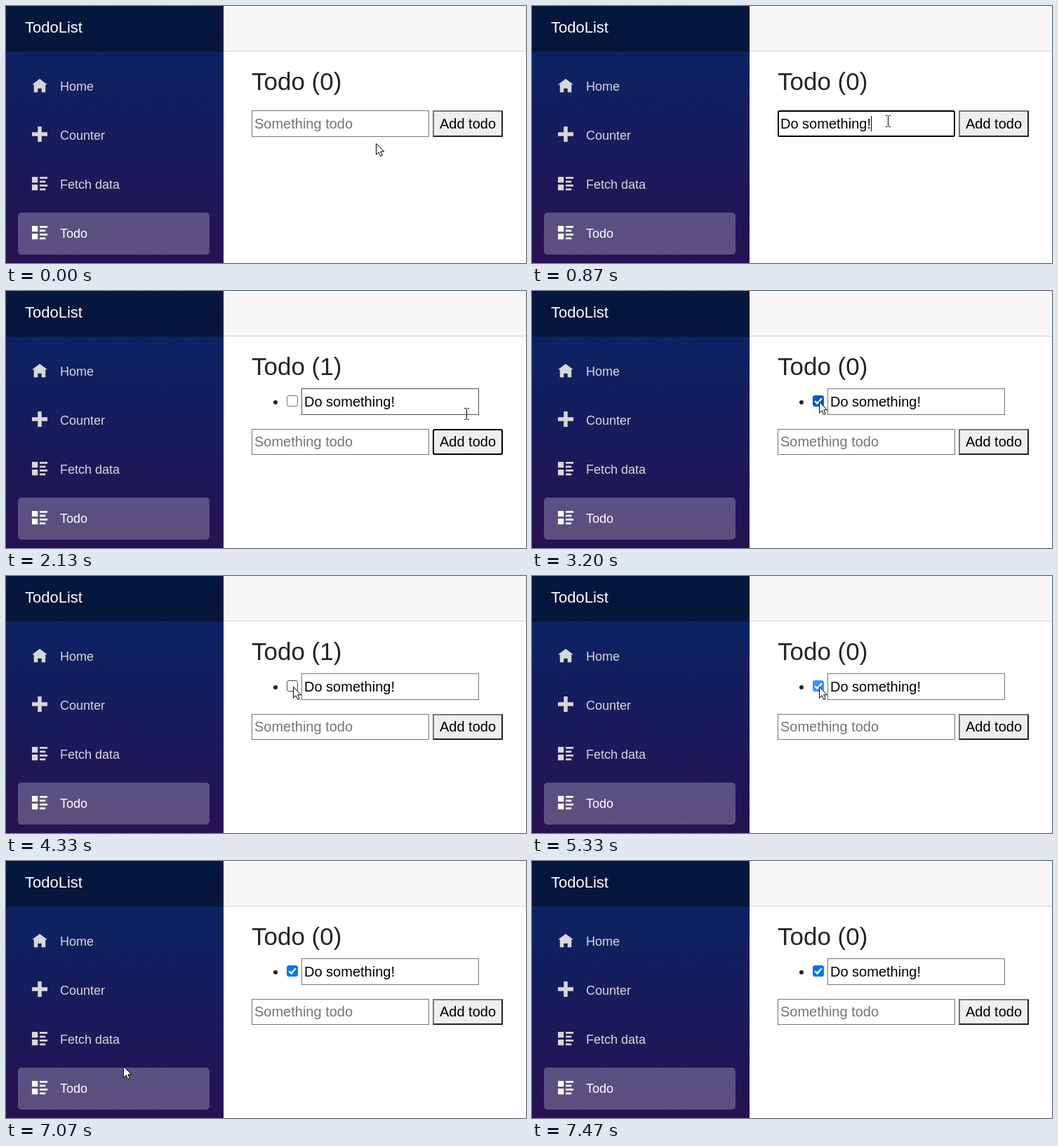
An HTML page that plays this animation: 741 by 367 pixels, repeating every 7.94 s.

```html
<!DOCTYPE html>
<html lang="en">
<head>
<meta charset="utf-8">
<title>Todo list</title>
<style>
  html, body { margin: 0; width: 100%; height: 100%; overflow: hidden; background: #fff; }
  body { position: relative; font-family: "Liberation Sans", Arial, sans-serif; color: #212529; }
  body *, body *::before { box-sizing: border-box; }
  .abs, .nav { position: absolute; white-space: pre; }
  #side { left: 0; top: 0; width: 310px; height: 367px;
    background: linear-gradient(rgb(5,39,103) -5px, #3a0647 585px); }
  #brand { left: 0; top: 0; width: 310px; height: 65px; padding-left: 27px;
    background: rgba(0,0,0,.4); color: #fff; font-size: 22px; line-height: 61px; }
  #bar { left: 310px; top: 0; width: 431px; height: 65px; background: #f7f7f7; border-bottom: 1px solid #d6d5d5; }
  .nav { left: 17px; width: 273px; height: 60px; padding-left: 60px; border-radius: 5px;
    color: #d7d7d7; font-size: 18px; line-height: 60px; }
  .nav svg { position: absolute; left: 20px; top: 19px; width: 22px; height: 22px; fill: currentColor; }
  .nav.active { color: #fff; background: rgba(255,255,255,.25); }
  .nav.hover { color: #fff; background: rgba(255,255,255,.1); }
  #title { left: 350px; top: 88px; font-size: 35px; line-height: 39px; }
  .field { width: 253px; height: 38px; padding-left: 3px; border: 1px solid #767676;
    background: #fff; color: #000; font-size: 20px; line-height: 36px; }
  .field.hover { border-color: #4f4f4f; }
  .empty { color: #757575; }
  .ring { outline: 2px solid #000; outline-offset: -2px; border-radius: 3px; }
  #entry { left: 350px; top: 149px; }
  #add { left: 608px; top: 149px; width: 100px; height: 38px; border: 2px solid;
    border-color: #767676 #212121 #212121 #767676; background: #efefef; color: #000;
    font-size: 20px; line-height: 34px; text-align: center; }
  #add.hover { background: #e5e5e5; }
  #add.down { background: #f5f5f5; }
  .listed #entry, .listed #add { top: 197px; height: 37px; }
  .listed #entry { line-height: 35px; }
  .listed #add { line-height: 33px; }
  #caret { top: 157px; width: 1px; height: 22px; background: #000; }
  #item { display: none; }
  .listed #item { display: block; }
  #item .field { left: 421px; top: 139px; }
  #dot { left: 381px; top: 156px; width: 6px; height: 6px; border-radius: 50%; background: #212529; }
  #box { left: 400px; top: 149px; width: 16px; height: 16px; border: 1px solid #767676;
    border-radius: 3px; background: #fff; }
  #box svg { position: absolute; left: -1px; top: -1px; visibility: hidden; }
  #box.hover { border-color: #4f4f4f; }
  #box.down { border-color: #8d8d8d; }
  #box.on { background: #0075ff; border-color: #0075ff; }
  #box.on.hover { background: #005cc8; border-color: #005cc8; }
  #box.on.down { background: #3793ff; border-color: #3793ff; }
  #box.on svg { visibility: visible; }
  #pointer { left: 0; top: 0; overflow: visible; }
</style>
</head>
<body>
<div id="side" class="abs"></div>
<div id="brand" class="abs">TodoList</div>
<div id="bar" class="abs"></div>
<div id="title" class="abs"></div>
<div id="item">
  <div id="dot" class="abs"></div>
  <div id="box" class="abs"><svg width="16" height="16"><path d="M3.2 8.2L6.6 11.6L12.8 4.2" fill="none" stroke="#fff" stroke-width="2.4"/></svg></div>
  <div id="task" class="abs field">Do something!</div>
</div>
<div id="entry" class="abs field"></div>
<div id="caret" class="abs"></div>
<div id="add" class="abs">Add todo</div>
<svg id="pointer" class="abs" width="1" height="1">
  <path id="arrow" d="M.5 .5V16.3L4.2 12.8L6.7 18.5L9.2 17.4L6.8 11.8H11.7Z" fill="#fff" stroke="#000"/>
  <path id="beam" d="M-3 -7.5H-.5M1.5 -7.5H4M.5 -7V8M-3 8.5H-.5M1.5 8.5H4" fill="none" stroke="#000"/>
</svg>
<script>
const LOOP = 7940, FRAME = 1000 / 15;
const $ = id => document.getElementById(id);

const LIST_ICON = 'M0 0h3v3H0zM4 0h4v1H4zM4 2h3v1H4zM0 4h3v3H0zM4 4h4v1H4zM4 6h3v1H4z';
const navs = [
  ['Home', 'M4 0L0 3h1v4h2V5h2v2h2V3h1z'],
  ['Counter', 'M3 0v3H0v2h3v3h2V5h3V3H5V0z'],
  ['Fetch data', LIST_ICON],
  ['Todo', LIST_ICON],
].map(([label, icon], i) => {
  const nav = document.createElement('div');
  nav.className = 'nav' + (label === 'Todo' ? ' active' : '');
  nav.style.top = 85 + 70 * i + 'px';
  const lift = label === 'Counter' ? -2 : 0;
  nav.innerHTML = `<svg viewBox="0 0 8 8" style="margin-top:${lift}px"><path d="${icon}"/></svg>${label}`;
  $('side').after(nav);
  return nav;
});

// Pointer path: time, x, y
const path = [
  [0, 527, 196], [70, 522, 189], [130, 508, 171], [200, 502, 163], [1000, 508, 164],
  [1130, 575, 172], [1270, 645, 179], [1330, 655, 178], [1930, 655, 178], [2130, 656, 175],
  [2270, 656, 175], [2400, 634, 172], [2600, 535, 164], [2800, 440, 158], [2930, 412, 157],
  [3000, 409, 158], [6730, 409, 158], [6800, 396, 164], [6930, 275, 230], [7000, 208, 270],
  [7070, 167, 293], [7200, 142, 318], [7400, 128, 357],
];

// Each change of a state: time, value
const pressed = [[0, ''], [1930, 'add'], [2130, ''], [3130, 'box'], [3200, ''], [4200, 'box'], [4270, ''],
  [5000, 'box'], [5130, ''], [5330, 'box'], [5530, ''], [6000, 'box'], [6130, '']];
const checked = [[0, 0], [3200, 1], [4270, 0], [5130, 1], [5530, 0], [6130, 1]];
const count = [[0, 0], [2130, 1], [3200, 0], [4330, 1], [5130, 0], [5530, 1], [6200, 0]];
const focus = [[0, ''], [330, 'entry'], [1930, 'add'], [3130, 'box']];

const at = (steps, t) => steps.findLast(s => s[0] <= t)[1];

function pointerAt(t) {
  const i = path.findIndex(p => p[0] > t);
  if (i < 0) return path.at(-1).slice(1);
  const [a, b] = [path[i - 1], path[i]];
  const k = (t - a[0]) / (b[0] - a[0]);
  return [1, 2].map(n => Math.round(a[n] + (b[n] - a[n]) * k));
}

function draw(now) {
  // Times snap to a 15 fps grid rounded to 10 ms
  const t = Math.round(Math.floor((now + 3.4) / FRAME) * FRAME / 10) * 10;
  const listed = t >= 2130, typed = t >= 870 && !listed;
  const visible = t < 7470;
  const [x, y] = pointerAt(t);
  const down = at(pressed, t), focused = at(focus, t);

  document.body.classList.toggle('listed', listed);
  $('title').textContent = `Todo (${at(count, t)})`;
  $('entry').textContent = typed ? 'Do something!' : 'Something todo';
  $('entry').classList.toggle('empty', !typed);
  $('caret').style.left = (typed ? 483 : 354) + 'px';
  $('caret').hidden = focused !== 'entry' || t >= 1400;
  $('box').classList.toggle('on', !!at(checked, t));

  const entryTop = listed ? 197 : 149;
  const over = (el, left, top, w, h) => {
    const inside = visible && x >= left && x < left + w && y >= top && y < top + h;
    el.classList.toggle('hover', inside);
    return inside;
  };
  navs.forEach((nav, i) => over(nav, 17, 85 + 70 * i, 273, 60));
  over($('add'), 608, entryTop, 100, 38);
  over($('box'), 400, 149, 16, 16);
  const overEntry = over($('entry'), 350, entryTop, 253, 38);
  const overTask = over($('task'), 421, 139, 253, 38) && listed;
  const text = overEntry || overTask;

  for (const id of ['add', 'box']) $(id).classList.toggle('down', down === id);
  for (const id of ['add', 'entry']) $(id).classList.toggle('ring', focused === id);

  $('pointer').style.display = visible ? '' : 'none';
  $('pointer').style.transform = `translate(${x}px, ${y}px)`;
  $('arrow').style.display = text ? 'none' : '';
  $('beam').style.display = text ? '' : 'none';
}

const start = performance.now();
function tick() {
  draw((performance.now() - start) % LOOP);
  requestAnimationFrame(tick);
}
tick();
</script>
</body>
</html>
```
